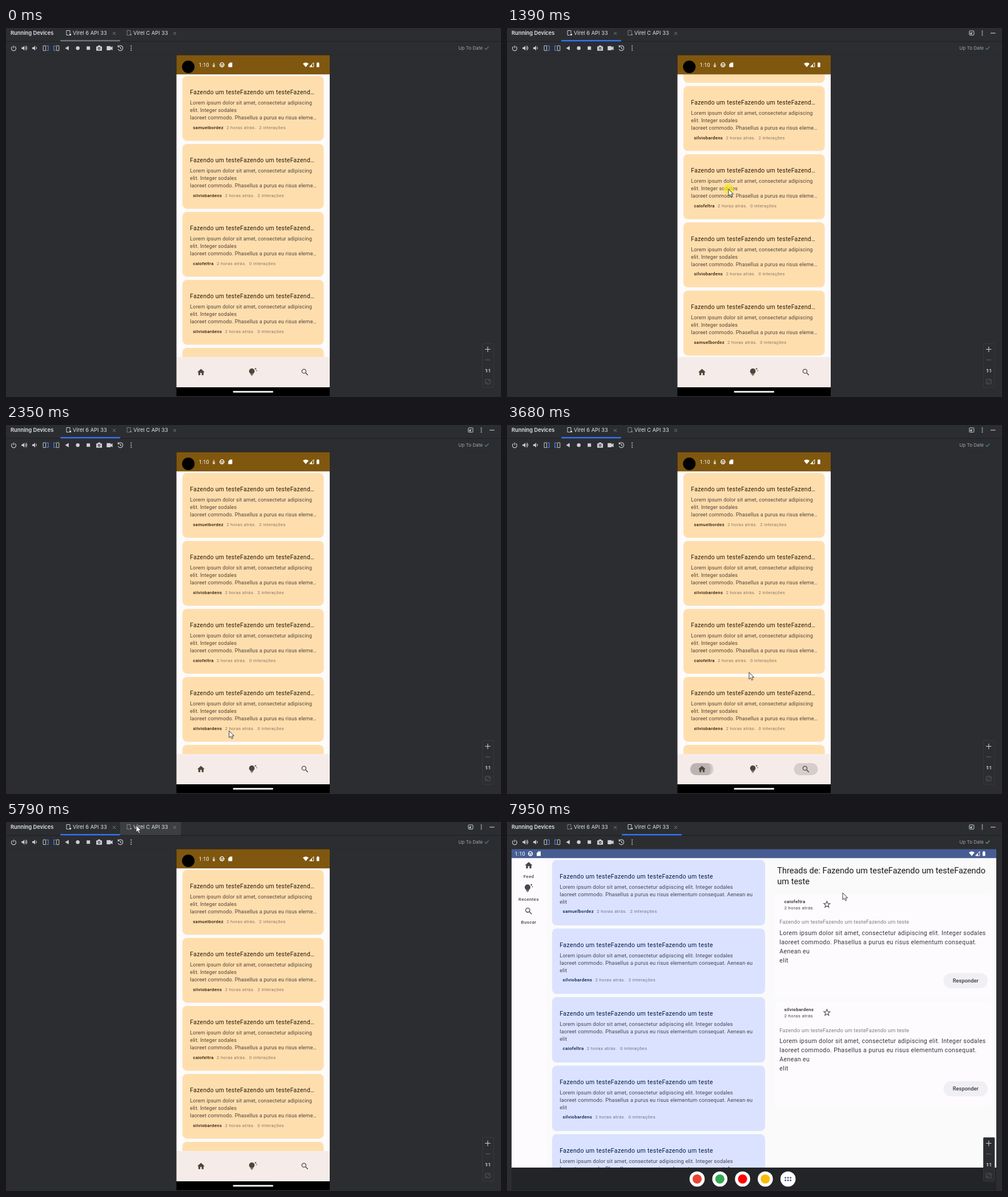
Recreate the animation shown at these times as an HTML page. Size 867 by 646 pixels, loop 8000 ms.

```html
<!DOCTYPE html>
<html lang="pt">
<head>
<meta charset="utf-8">
<title>Running Devices</title>
<style>
  html, body { margin: 0; width: 100%; height: 100%; overflow: hidden; background: #2b2d30; }
  svg { display: block; width: 867px; height: 646px; }
  text { font-family: Roboto, sans-serif; white-space: pre; }
  .ide text { font-family: Inter, sans-serif; }
</style>
</head>
<body>
<svg id="stage" viewBox="0 0 867 646" xmlns="http://www.w3.org/2000/svg"></svg>
<script>
const LOOP = 8000, ENTER = 290, SWITCH = 7130;
const DRAG = [960, 2080], LAG = 146, TAP = 80;
const INK = '#ced0d6', DIM = '#6f737a', PANEL = '#2b2d30';
const S = .65, T = .6635; // px per dp on phone and tablet

const [ana, bia, caio] = ['samuelbordez', 'silviobardens', 'caiofeltra'];
const posts = [[ana, 2], [bia, 2], [caio, 0], [bia, 0], [ana, 0]];
const lorem = 'Lorem ipsum dolor sit amet, consectetur adipiscing';
const rest = 'laoreet commodo. Phasellus a purus eu risus eleme';
const topic = 'Fazendo um teste';
const nav = ['home', 'bulb', 'search'];

// Drawing helpers
const text = (x, y, size, color, str, ls = 0, weight = 400, anchor = 'start') =>
  `<text x="${x}" y="${y}" font-size="${size}" fill="${color}" letter-spacing="${ls}" font-weight="${weight}" text-anchor="${anchor}">${str}</text>`;
const rect = (x, y, w, h, color, rx = 0, more = '') =>
  `<rect x="${x}" y="${y}" width="${w}" height="${h}" rx="${rx}" fill="${color}" ${more}/>`;
const disc = (x, y, r, color, more = '') => `<circle cx="${x}" cy="${y}" r="${r}" fill="${color}" ${more}/>`;
const fill = (d, color = INK) => `<path d="${d}" fill="${color}"/>`;
const line = (d, color = INK, w = 1.1) => `<path d="${d}" fill="none" stroke="${color}" stroke-width="${w}"/>`;
const group = (id, body, more = '') => `<g id="${id}" ${more}>${body}</g>`;
const move = (x, y, body, k = 1) => `<g transform="translate(${x} ${y}) scale(${k})">${body}</g>`;
const times = (n, fn) => Array.from({ length: n }, (_, i) => fn(i)).join('');
const dots = (x, y, gap) => times(3, i => disc(x, y + (i - 1) * gap, 1, INK));

// Symbols centred on 0,0 in a 24 unit box
const symbols = {
  home: c => fill('M0-9-10 0h3v8h5v-6h4v6h5v-8h3z', c),
  bulb: c => disc(-3, -2.5, 7.5, c) + fill('M-7 2h8v2h-8zM-7 7h8v-2h-8zM-5 8h4a2 2 0 0 1-4 0z', c) +
    fill('M7-12 8-10 10-9 8-8 7-6 6-8 4-9 6-10z', c) + fill('M10-6l.6 1.4 1.4.6-1.4.6-.6 1.4-.6-1.4-1.4-.6 1.4-.6z', c),
  search: c => disc(-2.5, -2.5, 5.5, 'none', `stroke="${c}" stroke-width="2"`) + line('M2 2l6 6', c, 2.2)
};
const icon = (name, x, y, s, color) => move(x, y, symbols[name](color), s);

function star(x, y) {
  const points = times(10, i => {
    const r = i % 2 ? 2.5 : 5.8, a = i * Math.PI / 5;
    return `${x + r * Math.sin(a)},${y - r * Math.cos(a)} `;
  });
  return `<polygon points="${points}" fill="none" stroke="#45464f" stroke-width="1.1"/>`;
}

function card(i, x, y, w, h, s, [bg, head, body, faint], title, lines) {
  const [user, count] = posts[i], pad = x + 13.3;
  const span = str => `<tspan dx="5.2" fill="${faint}" font-weight="400">${str}</tspan>`;
  return rect(x, y, w, h, bg, 12 * s) +
    text(pad, y + 32.3, 16 * s, head, title, .5 * s) +
    times(lines.length, k => text(pad, y + 50.3 + 20 * s * k, 14 * s, body, lines[k], .2 * s)) +
    text(pad + 5.2, y + 92.9, 12 * s, head, user + span('2 horas atrás.') + span(count + ' interações'), .5 * s, 500);
}

function statusBar(x, y, right) {
  const badge = disc(0, 0, 3.6, 'none', 'stroke="#fff" stroke-width="1.3"') + line('M-3.6 0h7.2M0 0v3.6', '#fff') +
    fill('M14-4h4v8h-7v-5z', '#fff');
  const signal = fill('M-5-2Q0-6 5-2L0 4z', '#fff') + line('M6.6 3.5h7.2v-7.4z', '#fff', 1) +
    fill('M6.6 3.5h4.4v-4.4z', '#fff') + rect(19, -3.4, 4.6, 7.4, '#fff', .7) + rect(20.2, -4.3, 2.2, 1.2, '#fff');
  return move(x, y, badge) + move(right, y, signal);
}

const cardTop = i => 84 + 119 * i;
const navX = i => 341.5 + 91 * i;

function phone() {
  const colors = ['#ffdeae', '#281900', '#4f4539', '#857763'];
  const lines = [lorem, 'elit. Integer sodales', rest + '…'];
  const title = topic + topic + 'Fazend…';
  return rect(298.5, 47.5, 268.5, 597, '#000') + rect(298.5, 81, 268.5, 495, '#fdfbfb') +
    `<g clip-path="url(#feed)">` +
    group('list', times(5, i => card(i, 309, cardTop(i), 247.5, 113.4, S, colors, title, lines))) + '</g>' +
    rect(298.5, 47.5, 268.5, 33.7, '#7f570f') + disc(319.3, 68, 11, '#000') +
    text(337.7, 68, 14 * S, '#fff', '1:10', .1) + line('M364 61v4M362 64.5l2 2.5 2-2.5M362 67.7h4', '#fff') +
    statusBar(378.3, 64.5, 525) +
    rect(298.5, 576, 268.5, 53, '#f5ecea') + group('ripples', '') +
    times(3, i => icon(nav[i], navX(i), 602.5, S, '#4f4539')) +
    rect(397.5, 635.5, 70.5, 2.7, '#fff', 1.3);
}

function thread(y, user) {
  const body = [lorem + ' elit. Integer sodales', rest + 'ntum consequat.', 'Aenean eu', 'elit'];
  return rect(469, y, 380, 183, '#fefbff', 8) +
    text(485.5, y + 15.8, 12 * T, '#1b1b1f', user, .5 * T, 500) +
    text(485.5, y + 26.8, 12 * T, '#45464f', '2 horas atrás', .5 * T) +
    star(560.3, y + 18.5) +
    text(477.3, y + 52.4, 14 * T, '#7d7d83', topic.repeat(3), .2 * T) +
    times(4, i => text(477.3, y + 71.8 + 24 * T * i, 16 * T, '#36373c', body[i], .52 * T)) +
    rect(764.5, y + 138.5, 77.5, 26.5, '#f0eff3', 13.2) +
    text(803.3, y + 155, 14 * T, '#3a3b41', 'Responder', .1 * T, 500, 'middle');
}

function tablet() {
  const colors = ['#dae2ff', '#001947', '#45464f', '#6f7482'];
  const lines = [lorem + ' elit. Integer sodales', rest + 'ntum consequat. Aenean eu', 'elit'];
  const labels = ['Feed', 'Recentes', 'Buscar'];
  const apps = ['#ea4335', '#34a853', '#ff0000', '#fbbc04'];
  const appX = i => 333 + 39.8 * i;
  return rect(8, 47.5, 849, 597.5, '#222427') +
    rect(8, 63, 849, 542, '#fafafb') + rect(8, 63, 61, 542, '#fefbff') +
    `<g clip-path="url(#pane)">` +
    times(5, i => card(i, 79, 66.5 + 120 * i, 373, 114.5, T, colors, topic.repeat(3), lines)) + '</g>' +
    rect(8, 47.5, 849, 15.7, '#475d92') + text(13.5, 58.8, 14 * T, '#fff', '1:10', .1) +
    statusBar(41, 55.5, 814) +
    times(3, i => icon(nav[i], 38, 76 + 40 * i, T, '#45464f') +
      text(38, 98 + 40 * i, 12 * T, '#45464f', labels[i], .5 * T, 500, 'middle')) +
    text(473.3, 90, 14.52, '#1b1b1f', 'Threads de: ' + topic + topic + 'Fazendo') +
    text(473.3, 108.5, 14.52, '#1b1b1f', 'um teste') +
    thread(126, caio) + thread(315.3, bia) +
    times(5, i => disc(appX(i), 625, 13.3, '#fff') + (apps[i] ? disc(appX(i), 625, 8, apps[i]) : '')) +
    times(6, i => disc(appX(4) + 4.5 * (i % 3 - 1), 622.8 + 4.5 * (i > 2), 1.5, '#4a5a80'));
}

const tab = (id, x, label) =>
  group(id, line(`M${x + 6.5} 12.5h-4.5v-8h6v4.5`, INK, 1) + fill(`M${x + 7} 10h3v3h-3z`)) +
  text(x + 13, 12.3, 9.3, '#dfe1e5', label) + line(`M${x + 83} 7l5 5m0-5l-5 5`, '#8a8d94', .9);

function toolbar() {
  const speaker = fill('M-5-1.5h2.3l2.7-2.7v8.4l-2.7-2.7h-2.3z') + line('M1.5-2q2 2 0 4');
  const rotate = rect(-4.5, -4.2, 4.5, 8.6, 'none', .5, `stroke="${INK}"`) + line('M1-4h3.5v8h-3.5', '#548af7');
  const buttons = [
    line('M-2-2.8a4 4 0 1 0 4 0M0-4.5v4.5'),
    speaker + line('M2.5-4q4 4 0 8'),
    speaker,
    rotate,
    `<g transform="scale(-1 1)">${rotate}</g>`,
    fill('M-3.5 0 2.8-3.8v7.6z'),
    disc(0, 0, 3.2, INK),
    rect(-3.2, -3, 6, 6, INK),
    fill('M-5-3h2.5l1-1.6h3l1 1.6h2.5v7.6h-10z') + disc(0, .6, 2.2, PANEL) + disc(0, .6, 1.1, INK),
    fill('M-5.5-3.4h7v2.2l3.3-2v6.9l-3.3-2v2.2h-7z'),
    line('M-4-2.2a4.4 4.4 0 1 1-.3 3.8M-4.2-5v3h3M0-2.2v2.7l2 1.2'),
    dots(0, 0, 3.6)
  ];
  return times(buttons.length, i => move(13.5 + 18.7 * i, 35.2, buttons[i]));
}

const ide = () => group('hover', '') +
  line('M0 23.5h867', '#1e1f22', 1) + line('M0 47.3h867', '#26282b', .6) +
  rect(95, 21, 105, 2.5, DIM, 1, 'id="under"') +
  text(8, 12.3, 9.3, '#dfe1e5', 'Running Devices', 0, 600) +
  tab('tabA', 104, 'Virel 6 API 33') + tab('tabB', 210, 'Virel C API 33') +
  disc(217, 11.6, 1.6, '#57a64a', 'id="live"') +
  group('tools', rect(809.8, 5, 8, 7.6, 'none', 1, `stroke="${INK}"`) + line('M812 10.5l3-3M812 8v2.5h2.5') +
    dots(832.5, 8.8, 3.4) + line('M847 9h8.5')) +
  toolbar() + text(792.3, 38, 8.1, '#a4a7ae', 'Up To Date') +
  '<path id="check" d="M838.5 35.2l2.3 2.3 4.5-5" fill="none" stroke-width="1.4"/>';

const zoom = () => rect(834.5, 552.5, 19.5, 76.5, PANEL, 1, 'stroke="#3c3e42" stroke-width=".8"') +
  line('M839 562.5h9.5M843.8 557.8v9.5') + line('M839.5 581h8.5', DIM, .8) +
  text(843.8, 602.8, 7.4, '#dfe1e5', '1:1', 0, 600, 'middle') +
  rect(839.5, 615, 8.6, 8, 'none', 1, 'stroke="#5a5d63" stroke-width=".9"') +
  line('M841.5 619v2h2M846 619v-2h-2', '#5a5d63', .8);

// Where the pointer rests or turns: time, x, y
const stops = [
  [ENTER, 440, 645], [DRAG[0], 397, 428], [1390, 388, 282], [1860, 428, 427], [DRAG[1], 432, 478],
  [2650, 343, 602], [2740, 343, 602], [2940, 432, 602], [3175, 522, 602], [3380, 339, 602], [3540, 341, 602],
  [3680, 424, 433], [4150, 424, 141], [4420, 427, 254], [4760, 331, 421],
  [5170, 176, 30], [5780, 228, 6], [7730, 228, 6], [7950, 588, 124]
];
function pointer(t) {
  const i = stops.findIndex(s => t < s[0]);
  if (i < 1) return stops.at(i).slice(1);
  const [a, b] = [stops[i - 1], stops[i]];
  const p = (t - a[0]) / (b[0] - a[0]), e = p * p * (3 - 2 * p);
  return [a[1] + (b[1] - a[1]) * e, a[2] + (b[2] - a[2]) * e];
}

// Taps: the ripple follows after LAG, from the place that was tapped
const onNav = (t, i) => ({ t, box: [navX(i) - 21, 592, 42, 21, '#000', 10.5], life: 480, speed: .2 });
const onCard = (t, i) => ({ t, box: [309, cardTop(i), 247.5, 113.4, '#000', 8], life: 640, speed: 1 });
const taps = [onNav(2660, 0), onNav(2945, 1), onNav(3185, 2), onNav(3385, 0), onCard(4145, 0), onCard(4415, 1)];
const presses = [DRAG, ...taps.map(({ t }) => [t, t + TAP]), [7055, 7265]];

const stage = document.getElementById('stage');
const clip = (id, ...box) => `<clipPath id="${id}">${rect(...box)}</clipPath>`;
stage.innerHTML = '<defs>' +
  clip('feed', 298.5, 81, 268.5, 495) + clip('pane', 8, 63, 849, 542) +
  times(taps.length, i => clip('clip' + i, ...taps[i].box)) +
  '<radialGradient id="soft"><stop offset=".6"/><stop offset="1" stop-opacity="0"/></radialGradient></defs>' +
  rect(0, 0, 867, 646, PANEL) + group('ide', ide(), 'class="ide"') +
  group('phone', phone()) + group('tablet', tablet()) + group('zoom', zoom(), 'class="ide"') +
  group('mouse', disc(0, 0, 9, '#f7ea1c', 'id="press" opacity=".68"') +
    '<path d="M0 0v12l2.7-2.5 2 4.3 2-1-1.9-4h3.8z" fill="#fff" stroke="#222" stroke-width=".9" stroke-linejoin="round"/>');

const $ = id => document.getElementById(id);
const set = (id, attrs) => Object.entries(attrs).forEach(([k, v]) => $(id).setAttribute(k, v));
const show = (id, on) => set(id, { display: on ? 'inline' : 'none' });

$('ripples').innerHTML = times(taps.length, i => {
  const [x, y] = pointer(taps[i].t);
  return `<g clip-path="url(#clip${i})">${disc(x, y, 0, 'url(#soft)', `id="ripple${i}"`)}</g>`;
});

function draw(t) {
  const big = t >= SWITCH, focus = t >= DRAG[0];
  const [x, y] = pointer(t);

  show('phone', !big);
  show('tablet', big);
  show('live', big);
  show('tools', focus);
  set('tabA', { opacity: big ? .5 : 1 });
  set('tabB', { opacity: big ? 1 : .5 });
  set('under', { x: big ? 201 : 95, fill: focus ? '#3574f0' : DIM });
  set('check', { stroke: big ? '#57a64a' : '#47788a' });

  const over = y < 23 && x > 94 && x < 307;
  $('hover').innerHTML = over ? rect(x < 200 ? 94 : 200, 0, 106.5, 23, '#3c3e42') : '';

  // The list trails the dragging finger and stretches past its end
  const held = t - LAG >= DRAG[0] && t - LAG < DRAG[1];
  const pull = held ? pointer(t - LAG)[1] - pointer(DRAG[0])[1] : 0;
  const scroll = Math.max(-100, Math.min(0, pull));
  const k = 1 + Math.max(0, -100 - pull) * .0004;
  set('list', { transform: `translate(0 ${576 - 576 * k + scroll * k}) scale(1 ${k})` });

  taps.forEach((tap, i) => {
    const age = t - tap.t - LAG, on = age >= 0 && age < tap.life;
    set('ripple' + i, {
      r: on ? (65 + .43 * age) * tap.speed : 0,
      opacity: .24 * Math.max(0, Math.min(1, 2 - 2 * age / tap.life))
    });
  });

  show('mouse', t >= ENTER);
  show('press', presses.some(([a, b]) => t >= a && t < b));
  set('mouse', { transform: `translate(${x} ${y})` });
}

const begin = performance.now();
function tick() {
  draw((performance.now() - begin) % LOOP);
  requestAnimationFrame(tick);
}
tick();
</script>
</body>
</html>
```
